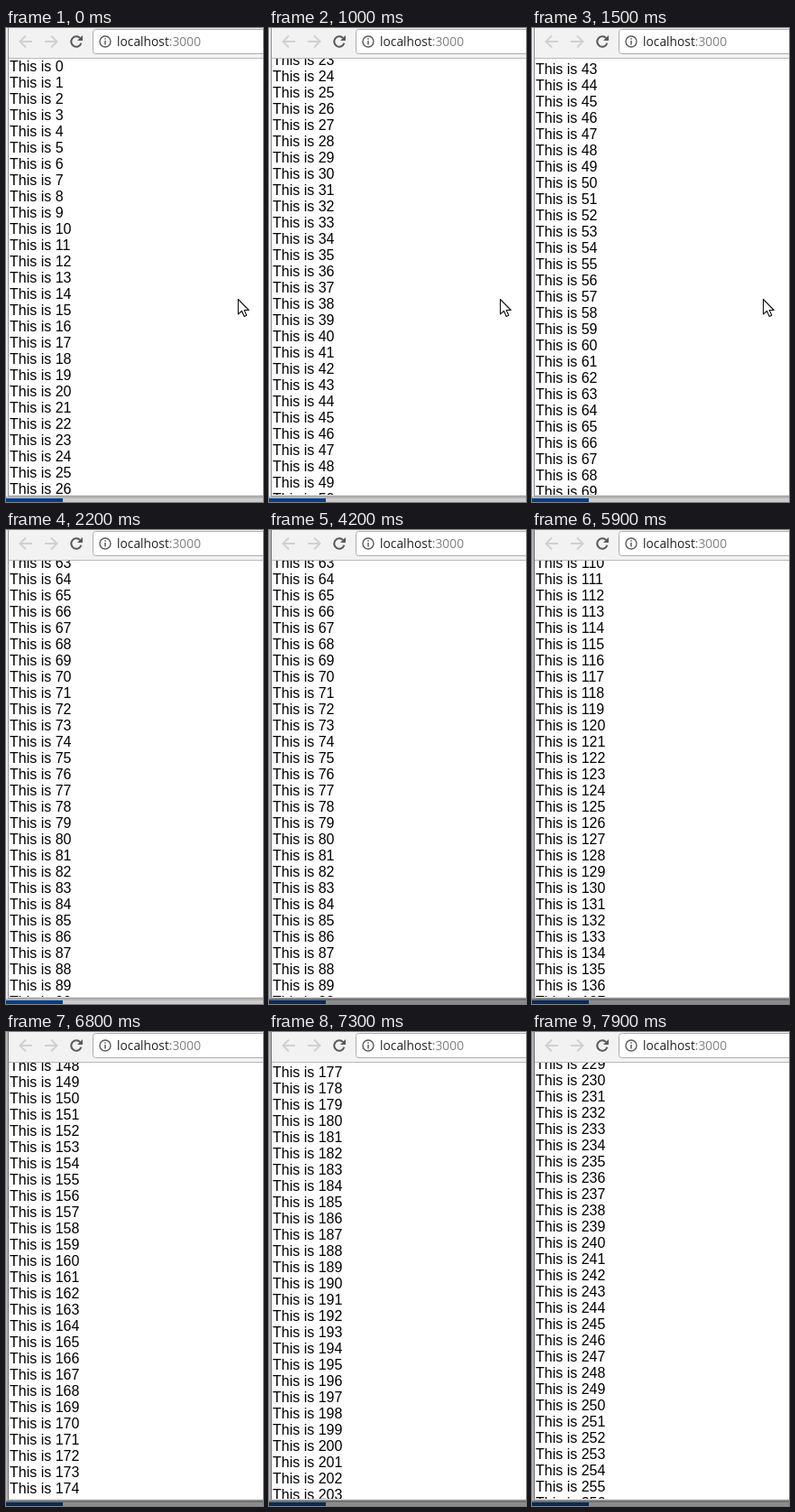
These frames come from a looping animation (285x525 px, 8000 ms). An HTML page:

```html
<!DOCTYPE html>
<html lang="en">
<head>
<meta charset="utf-8">
<title>Scrolling list</title>
<style>
  html, body { margin: 0; width: 100%; height: 100%; overflow: hidden; background: #fff; }
  svg { display: block; width: 285px; height: 525px; }
  #rows { font: 16px "Liberation Sans", Arial, sans-serif; fill: #000; }
  .address { font: 13.8px "Open Sans", "Noto Sans", sans-serif; fill: #222; }
</style>
</head>
<body>
<svg viewBox="0 0 285 525">
  <defs><clipPath id="page"><rect x="3" y="34" width="282" height="483"/></clipPath></defs>
  <rect width="285" height="525" fill="#fff"/>

  <g id="rows" clip-path="url(#page)"></g>

  <rect x="3" width="282" height="33" fill="#f2f2f2"/>
  <rect x="3" y="33" width="282" height="1" fill="#b8b8b8"/>
  <g fill="none" stroke="#d0d0d0" stroke-width="2">
    <path d="M29 15H16.5M22 8.5L15.5 15L22 21.5"/>
    <path d="M43 15H55.5M50 8.5L56.5 15L50 21.5"/>
    <path d="M82.2 11.2A5.7 5.7 0 1 0 83.4 16.8" stroke="#5a5a5a"/>
  </g>
  <path d="M85 8V14H79Z" fill="#5a5a5a"/>
  <rect x="96.5" y="1.5" width="200" height="27" rx="3" fill="#fff" stroke="#adadad"/>
  <circle cx="110" cy="15" r="6" fill="none" stroke="#5a5a5a" stroke-width="1.4"/>
  <path d="M110 11.3V12.8M110 14V18.6" stroke="#5a5a5a" stroke-width="1.5"/>
  <text class="address" x="123" y="20">localhost<tspan fill="#808080">:3000</tspan></text>

  <rect id="edge" width="2" height="521"/>
  <rect id="border" x="2" width="1" height="519"/>
  <rect x="3" y="517" width="282" height="1" fill="#e4e4e4"/>
  <rect x="2" y="518" width="283" height="1" fill="#a2a2a2"/>
  <rect id="rim" y="519" width="285" height="2"/>
  <rect id="desk" y="521" width="285" height="4"/>
  <rect id="bar" y="521" width="63" height="4"/>

  <path id="cursor" d="M.5 .5V17L4.5 13.4L7.2 19.4L9.8 18.3L7.2 12.5H12.3Z"
        fill="#fff" stroke="#111" stroke-width="1.1" stroke-linejoin="round"/>
</svg>
<script>
const LOOP = 8000, STEP = 100, ROW = 18, BASELINE = 48;
const get = id => document.getElementById(id);

// [time, scroll offset]
const scrollPath = [
  [300, 0], [700, 281], [800, 281], [1600, 841], [1700, 841], [2200, 1140],
  [4700, 1140], [5400, 1735], [5600, 1735], [5900, 1986], [6100, 2155],
  [6200, 2155], [6300, 2250], [6400, 2250], [6800, 2669], [6900, 2669],
  [7600, 3571], [7700, 3571], [7800, 3841], [7900, 4129]
];
const cursorPath = [[400, 257], [500, 256], [1800, 256], [2200, 290]];

const rows = Array.from({ length: 29 }, () => {
  const row = document.createElementNS("http://www.w3.org/2000/svg", "text");
  row.setAttribute("x", 4);
  return get("rows").appendChild(row);
});

function valueAt(path, time) {
  const next = path.findIndex(point => point[0] >= time);
  if (next < 0) return path[path.length - 1][1];
  if (next === 0) return path[0][1];
  const [t0, v0] = path[next - 1], [t1, v1] = path[next];
  return Math.round(v0 + (v1 - v0) * (time - t0) / (t1 - t0));
}

function paintFrame(shaded) {
  const colors = shaded
    ? { edge: "#b4b4b4", border: "#6c6c6c", rim: "#707070", desk: "#8c8c8c", bar: "#0a2a54" }
    : { edge: "#ececec", border: "#8e8e8e", rim: "#b4b4b4", desk: "#cccccc", bar: "#0b3d82" };
  for (const id in colors) get(id).setAttribute("fill", colors[id]);
}

function render(elapsed) {
  const time = Math.floor(elapsed % LOOP / STEP) * STEP;
  const scroll = valueAt(scrollPath, time);
  const first = Math.floor(scroll / ROW);
  rows.forEach((row, i) => {
    row.textContent = "This is " + (first + i);
    row.setAttribute("y", BASELINE + (first + i) * ROW - scroll);
  });
  get("cursor").setAttribute("transform", `translate(${valueAt(cursorPath, time)} 300)`);
  paintFrame(time >= 4200);
}

const start = performance.now();
function tick() {
  render(performance.now() - start);
  requestAnimationFrame(tick);
}
tick();
</script>
</body>
</html>
```
